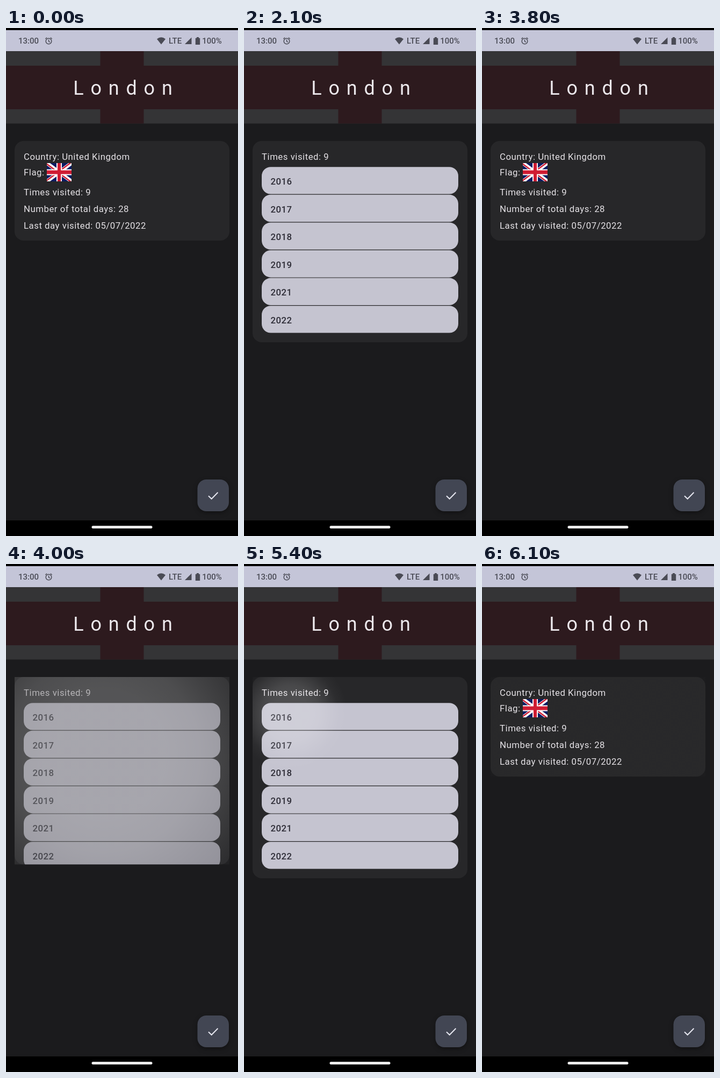
Write an HTML page that moves like this. It is 432 px wide and 944 px high and loops after 6200 ms.

```html
<!DOCTYPE html>
<html lang="en">
<head>
<meta charset="utf-8">
<title>City details</title>
<style>
html, body { margin: 0; width: 100%; height: 100%; overflow: hidden; background: #000; }
svg { display: block; }
#stage { width: 100%; height: 100%; }
text { font-family: Roboto, "Open Sans", sans-serif; white-space: pre; }
.body { font-size: 16.8px; letter-spacing: .52px; fill: #e5e2e6; }
.year { font-size: 16.8px; letter-spacing: .5px; font-weight: 500; fill: #2d2c36; }
.title { font-size: 36px; letter-spacing: 12.8px; fill: #ece8ec; }
.status { font-size: 15px; font-weight: 500; fill: #4a4b55; }
.icon { fill: #4a4b55; }
.line { fill: none; stroke: #4a4b55; stroke-width: 1.5; }
#fab { filter: drop-shadow(0 3px 4px rgba(0, 0, 0, .35)); }
</style>
</head>
<body>
<svg id="stage" viewBox="0 0 432 944">
  <defs>
    <clipPath id="cardClip"><rect id="clipBox" x="16" y="210" width="400" height="185"/></clipPath>
    <radialGradient id="wave" gradientUnits="userSpaceOnUse" cx="0" cy="0" r="1">
      <stop offset=".333" stop-color="#fff"/>
      <stop offset=".5" stop-color="#fff" stop-opacity=".844"/>
      <stop offset=".667" stop-color="#fff" stop-opacity=".5"/>
      <stop offset=".833" stop-color="#fff" stop-opacity=".156"/>
      <stop offset="1" stop-color="#fff" stop-opacity="0"/>
    </radialGradient>
  </defs>

  <rect width="432" height="944" fill="#000"/>
  <rect y="43" width="432" height="872" fill="#1b1b1d"/>

  <!-- status bar -->
  <rect y="4" width="432" height="39" fill="#c4c5d8"/>
  <text class="status" x="23" y="29">13:00</text>
  <g class="line">
    <circle cx="79.500" cy="24.500" r="5.300"/>
    <path d="M79.500 21.500v3.300l2.300 1.500M73.300 20.300l3-2.600M85.700 20.300l-3-2.600"/>
  </g>
  <path class="icon" d="M281 20.500Q289 14 297 20.500L289 30.500Z"/>
  <text class="status" x="303" y="29">LTE</text>
  <path class="icon" d="M345.500 17.500V30H333Z"/>
  <path class="icon" d="M355 17h4v1.700h2.200V31H352.800V18.700H355Z"/>
  <text class="status" x="365.300" y="29">100%</text>

  <!-- header -->
  <rect y="43" width="432" height="134.500" fill="#343436"/>
  <path d="M0 70H175.500V43H256.500V70H432V151H256.500V177.500H175.500V151H0Z" fill="#2d1a1e"/>
  <text class="title" x="125.300" y="123.500">London</text>

  <!-- card -->
  <rect id="card" x="16" y="210" width="400" height="185" rx="16.800" fill="#272729"/>
  <g clip-path="url(#cardClip)">
    <g id="info">
      <text class="body" x="33" y="245">Country: United Kingdom</text>
      <text class="body" x="33" y="274">Flag:</text>
      <svg x="76" y="251" width="46" height="34" viewBox="0 0 60 40" preserveAspectRatio="none">
        <rect width="60" height="40" fill="#0a1b62"/>
        <path d="M0 0L60 40M60 0L0 40" stroke="#fff" stroke-width="8.500"/>
        <path d="M0 0L30 20M60 40L30 20" stroke="#cf1b32" stroke-width="3" transform="translate(-.8 1.500)"/>
        <path d="M60 0L30 20M0 40L30 20" stroke="#cf1b32" stroke-width="3" transform="translate(-.8 -1.500)"/>
        <path d="M30 0V40M0 20H60" stroke="#fff" stroke-width="13"/>
        <path d="M30 0V40M0 20H60" stroke="#cf1b32" stroke-width="8"/>
      </svg>
      <text class="body" x="33" y="311">Times visited: 9</text>
      <text class="body" x="33" y="342">Number of total days: 28</text>
      <text class="body" x="33" y="373">Last day visited: 05/07/2022</text>
    </g>
    <g id="years">
      <text class="body" x="33" y="245">Times visited: 9</text>
    </g>
  </g>
  <rect id="ripple" x="16" y="210" width="400" height="185" fill="url(#wave)" opacity="0"/>

  <!-- button and navigation -->
  <rect id="fab" x="356.500" y="839" width="58.500" height="59" rx="16.500" fill="#424653"/>
  <path d="M377 869.500L382.700 875L394.500 863" fill="none" stroke="#e6e7f0" stroke-width="2"/>
  <rect x="159.500" y="925" width="113" height="5" rx="2.500" fill="#ececec"/>
</svg>

<script>
const $ = id => document.getElementById(id);
const clamp = x => Math.min(1, Math.max(0, x));
const mix = (a, b, k) => a + (b - a) * k;

const LOOP = 6200, STEP = 100;
const TOP = 210, CLOSED = 185, OPEN = 374;
const TOUCH = { x: 50, y: 243 };
const ENTER = 450, EXIT = 375;
const taps = [
  { press: 590, click: 655, open: true },
  { press: 2085, click: 2147, open: false },
  { press: 3770, click: 3825, open: true },
  { press: 5290, click: 5445, open: false }
];

function addNode(parent, tag, attrs, text = '') {
  const node = document.createElementNS('http://www.w3.org/2000/svg', tag);
  for (const key in attrs) node.setAttribute(key, attrs[key]);
  node.textContent = text;
  parent.append(node);
}

[2016, 2017, 2018, 2019, 2021, 2022].forEach((year, i) => {
  const y = 258.2 + i * 51.6;
  addNode($('years'), 'rect', { x: 33, y, width: 366, height: 50.4, rx: 16.8, fill: '#c5c4d0' });
  addNode($('years'), 'text', { x: 49.5, y: y + 32.8, class: 'year' }, year);
});

// cubic-bezier(.4, 0, .2, 1)
function ease(x) {
  let lo = 0, hi = 1;
  for (let i = 0; i < 20; i++) {
    const s = (lo + hi) / 2, r = 1 - s;
    if (1.2 * r * r * s + .6 * r * s * s + s ** 3 < x) lo = s; else hi = s;
  }
  return lo * lo * (3 - 2 * lo);
}

// critically damped spring, settling from 0 to 1
const spring = ms => 1 - (1 + ms / 50) * Math.exp(-ms / 50);

function drawRipple(age, height) {
  const k = age < ENTER ? .5 * ease(clamp(age / ENTER)) : .5 + .5 * clamp((age - ENTER) / EXIT);
  const fade = Math.min(clamp(k / .13), 1 - clamp((k - .4) / .6));
  const drift = clamp(k * 2);
  const radius = Math.hypot(200, height / 2) * 2.3 * k;
  const wave = $('wave');
  wave.setAttribute('cx', mix(TOUCH.x, 216, drift));
  wave.setAttribute('cy', mix(TOUCH.y, TOP + height / 2, drift));
  wave.setAttribute('r', Math.max(1, radius * 1.5));
  $('ripple').setAttribute('opacity', .21 * fade);
}

function draw(t) {
  let open = false, height = CLOSED, alpha = 1, age = 0;
  for (const tap of taps) {
    if (t >= tap.press) age = t - tap.press;
    if (t < tap.click) continue;
    const since = t - tap.click;
    open = tap.open;
    height = mix(open ? CLOSED : OPEN, open ? OPEN : CLOSED, spring(since));
    alpha = clamp(since / 265);
  }
  for (const id of ['card', 'clipBox', 'ripple']) $(id).setAttribute('height', height);
  $('info').setAttribute('opacity', open ? 0 : alpha);
  $('years').setAttribute('opacity', open ? alpha : 0);
  drawRipple(age, height);
}

const start = performance.now();
function tick() {
  const t = (performance.now() - start) % LOOP;
  draw(Math.floor(t / STEP) * STEP);
  requestAnimationFrame(tick);
}
tick();
</script>
</body>
</html>
```
